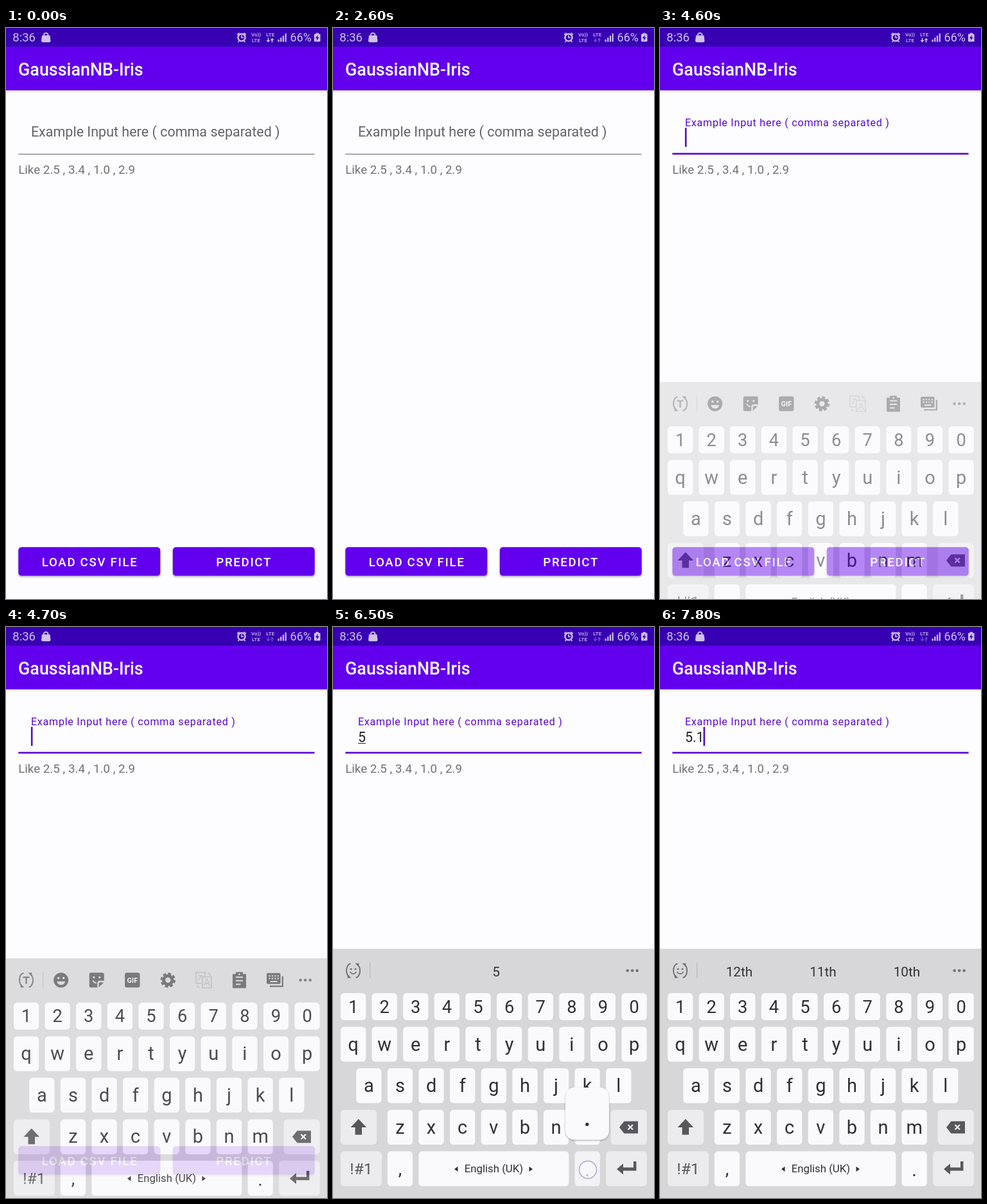
Recreate the animation shown at these times as an HTML page. Size 500 px wide and 889 px high, loop 8000 ms.

```html
<!DOCTYPE html>
<html lang="en">
<head>
<meta charset="utf-8">
<title>Iris classifier</title>
<style>
  html, body { margin: 0; width: 100%; height: 100%; overflow: hidden; background: #fdfdff; }
  svg { display: block; width: 100%; height: 100%; font-family: Roboto, sans-serif; }
  .button { filter: drop-shadow(0 2px 1.5px rgba(0, 0, 0, .3)); }
  .popup { filter: drop-shadow(0 1px 1px rgba(0, 0, 0, .35)); }
</style>
</head>
<body>
<svg id="stage" viewBox="0 0 500 889"></svg>
<script>
const LOOP = 8000, STEP = 100;
const PURPLE = '#6200ee', FOCUS = '#5808cc', ICON = '#666569', KEY = '#faf9fc', DARK_KEY = '#ecebee', BOARD = '#d7d6d9';
const STATUS = '#d0c2ee';

const rect = (x, y, w, h, fill, r = 0, more = '') =>
  `<rect x="${x}" y="${y}" width="${w}" height="${h}" rx="${r}" fill="${fill}" ${more}/>`;
const circle = (x, y, r, fill, more = '') => `<circle cx="${x}" cy="${y}" r="${r}" fill="${fill}" ${more}/>`;
const path = (d, fill, more = '') => `<path d="${d}" fill="${fill}" ${more}/>`;
const line = (d, color, width, more = '') => path(d, 'none', `stroke="${color}" stroke-width="${width}" ${more}`);
const text = (x, y, size, fill, str, more = '') =>
  `<text x="${x}" y="${y}" font-size="${size}" fill="${fill}" ${more}>${str}</text>`;
const group = (id, inner, more = '') => `<g id="${id}" ${more}>${inner}</g>`;
const at = (x, y, inner) => `<g transform="translate(${x} ${y})">${inner}</g>`;
const MID = 'text-anchor="middle"', BOLD = 'font-weight="700"', MEDIUM = 'font-weight="500"';

function statusBar() {
  const bars = [3.5, 6.5, 9.5, 13].map((h, i) => rect(423.5 + i * 3.7, 21.5 - h, 2.2, h, STATUS)).join('');
  return rect(0, 0, 500, 29, '#3700b3') +
    text(10.3, 21.3, 18.5, STATUS, '8:36') +
    path('M56 11.5H68.5L69.5 20Q69.5 22.3 67 22.3H57.5Q55 22.3 55 20Z', STATUS) +
    line('M59 13V10.5Q59 7.8 62.2 7.8T65.4 10.5V13', STATUS, 1.8) +
    circle(367, 14.8, 5.6, 'none', `stroke="${STATUS}" stroke-width="2.4"`) +
    line('M367 11.5V15H370M360.2 10.5L363.5 7.7M373.8 10.5L370.5 7.7M363 20L361.5 22M371 20L372.5 22', STATUS, 1.7) +
    text(389.5, 13.4, 8, STATUS, 'Vo))', MID + ' ' + MEDIUM) +
    text(389.5, 21.8, 8, STATUS, 'LTE', MID + ' ' + MEDIUM) +
    text(411.7, 13.4, 8, STATUS, 'LTE', MID + ' ' + MEDIUM) +
    path('M408.5 22.5L405.5 19H407.7V15.5H409.3V19H411.5Z', STATUS, 'id="down"') +
    path('M414.5 15.5L411.8 19H413.7V22.5H415.3V19H417.4Z', STATUS, 'id="up"') +
    bars +
    text(442.6, 21.3, 18, STATUS, '66%') +
    rect(480, 9.3, 9.6, 12, STATUS, 1.2) + rect(482.7, 7.7, 4.2, 2.5, STATUS) +
    path('M486 10.5L481.8 16H484.4L483.6 20L487.9 14.4H485.2Z', '#3700b3');
}

function page() {
  const hint = 'Example Input here ( comma separated )';
  const button = (x, tx, label) =>
    rect(x, 808.3, 221, 44.5, PURPLE, 4.8, 'class="button"') +
    text(tx, 837.6, 18.7, '#fff', label, MEDIUM + ' letter-spacing="1.67"');
  return rect(0, 0, 500, 889, '#fdfdff') +
    rect(0, 97, 500, 1.5, '#000', 0, 'opacity=".13"') + rect(0, 98.5, 500, 2, '#000', 0, 'opacity=".04"') +
    rect(0, 29, 500, 68, PURPLE) +
    text(19, 73.5, 26.9, '#fff', 'GaussianNB-Iris', MEDIUM) +
    text(38.9, 169, 21.5, '#646467', hint, 'id="hint"') +
    text(38.9, 153, 16.1, FOCUS, hint, 'id="label" letter-spacing=".75"') +
    text(38.9, 179, 21.4, '#222', '', 'id="input"') +
    rect(38.9, 180.6, 0, 1.2, '#333', 0, 'id="compose"') +
    rect(39, 155.5, 2.6, 29.5, '#4d10b8', 0, 'id="cursor"') +
    rect(19.3, 195.8, 461.3, 1.2, '#757578', 0, 'id="line"') +
    text(19.2, 227, 18.8, '#717174', 'Like 2.5 , 3.4 , 1.0 , 2.9') +
    button(19.3, 55.7, 'LOAD CSV FILE') + button(259.8, 327.3, 'PREDICT');
}

function swap() {
  return line('M-4 -10.5H-6Q-10.5 -7 -10.5 0T-6 9.5M4 10.5H6Q10.5 7 10.5 0T6 -9.5', '#747377', 2) +
    path('M-8.5 6L-3 11.5H-9ZM8.5 -6L3 -11.5H9Z', '#747377');
}

function tools() {
  const smile = circle(0, 0, 11.5, ICON) + circle(-4, -3.2, 1.8, BOARD) + circle(4, -3.2, 1.8, BOARD) +
    path('M-6.5 2H6.5Q5 7.5 0 7.5T-6.5 2Z', BOARD);
  const sticker = path('M-9 -11.5H9Q11.5 -11.5 11.5 -9V1H5Q1 1 1 5V11.5H-9Q-11.5 11.5 -11.5 9V-9Q-11.5 -11.5 -9 -11.5Z', ICON) +
    path('M3.5 11V5.5Q3.5 3.5 5.5 3.5H11Z', ICON) +
    circle(-4.5, -4.5, 1.6, BOARD) + circle(4.5, -4.5, 1.6, BOARD) + line('M-6 .5Q-4.5 4 -.5 4.5', BOARD, 1.8);
  const gif = rect(-11.7, -11.5, 23.4, 23, ICON, 3) + text(0, 4, 11, '#eeedf0', 'GIF', MID + ' ' + BOLD);
  const gear = circle(0, 0, 6.6, 'none', `stroke="${ICON}" stroke-width="5"`) +
    circle(0, 0, 10, 'none', `stroke="${ICON}" stroke-width="3.4" pathLength="80" stroke-dasharray="6 4"`);
  const pale = '#bebdc1';
  const translate = line('M-2 5H-12V-12H2V-5M-2 -5H12V12H-2Z', pale, 1.9) +
    text(5, 8.5, 15, pale, 'A', MID + ' ' + MEDIUM) +
    line('M-9 0L-4 -6M-8 -7H-2M6 -11Q10 -11 10 -7M-10 8Q-10 11 -6 11', pale, 1.8);
  const clip = path('M-10 -9H-5V-12H5V-9H10V12H-10Z', ICON, `stroke="${ICON}" stroke-linejoin="round"`) +
    line('M-5.5 -4.5H5.5M-5.5 1H5.5M-5.5 6.5H2', BOARD, 2.1) + circle(0, -9, 1.4, BOARD);
  const board = rect(-13, -11, 21.5, 17, ICON, 2) + line('M11.8 -6V9.5H-8', ICON, 2.2) +
    line('M-9.5 -6.5H6M-9.5 -2.5H6', BOARD, 2, 'stroke-dasharray="2.2 2.2"') + line('M-7 2.2H3.5', BOARD, 2);
  const icons = [smile, sticker, gif, gear, translate, clip, board];
  return icons.map((icon, i) => at(85.7 + i * 55.55, 535, icon)).join('') +
    at(31.5, 535, line('M-5 -4.5H5M0 -4.5V6', '#747377', 2.2));
}

function suggestions() {
  const face = circle(-3.5, -2.5, 1.5, '#747377') + circle(3.5, -2.5, 1.5, '#747377') + line('M-5 2Q0 8 5 2', '#747377', 1.8);
  return at(31.5, 535, face) +
    [0, 1, 2].map(i => text(123.5 + i * 130.5, 544, 20.8, '#343337', '', `${MID} class="word"`)).join('');
}

function key(x, y, w, h, label, base, size, fill = KEY, ink = '#302f33') {
  return `<g class="key" data-key="${label}">` + rect(x, y, w, h, fill, 5.5) +
    text(x + w / 2, base, size, ink, label, MID) + '</g>';
}

function keyboard() {
  const row = (chars, x, y, h, base, size) =>
    [...chars].map((c, i) => key(+(x + i * 48.62).toFixed(2), y, 39.3, h, c, base, size)).join('');
  const dots = [458.7, 466.2, 473.7].map(x => circle(x, 535, 2.3, '#747377')).join('');
  return rect(0, 501, 500, 440, BOARD) +
    at(31.5, 535, swap()) + rect(57, 522.5, 1.2, 24, '#bbbabd') + dots +
    group('tools', tools()) + group('suggest', suggestions()) +
    row('1234567890', 11.9, 570, 42, 600.5, 27.3) +
    row('qwertyuiop', 11.9, 622.5, 54.3, 659.5, 29) +
    row('asdfghjkl', 36.2, 687, 54.3, 724, 29) +
    row('zxcvbnm', 84.8, 751.8, 54.3, 788.5, 29) +
    rect(11.9, 751.8, 56.2, 54.3, DARK_KEY, 5.5) +
    path('M39.8 766L52 779H45V790.5H34.5V779H27.5Z', '#58575b') +
    rect(432.7, 751.8, 56.2, 54.3, DARK_KEY, 5.5) +
    path('M446 779L453.5 769.5H475V788.5H453.5Z', '#58575b') +
    line('M459.5 775L467 782.5M467 775L459.5 782.5', DARK_KEY, 2.3) +
    key(11.9, 816.3, 64, 54.3, '!#1', 852, 24.5, DARK_KEY, '#58575b') +
    key(84.8, 816.3, 39.3, 54.3, ',', 853, 28) +
    key(133.4, 816.3, 234, 54.3, 'English (UK)', 849, 16.8) +
    path('M194.5 840V848L189 844ZM305.5 840V848L311 844Z', '#302f33') +
    key(376.5, 816.3, 39.3, 54.3, '.', 855, 29) +
    rect(425.2, 816.3, 63.7, 54.3, DARK_KEY, 5.5) +
    path('M442 844L452 835.5V841.5H468V832H472.5V846.5H452V852.5Z', '#58575b') +
    group('popup', rect(-34, 0, 68, 81.5, KEY, 14, 'class="popup"') +
      text(0, 60.3, 48, '#302f33', '', MID + ' id="big"')) +
    circle(0, 0, 13.5, 'rgba(255,255,255,.35)', 'id="touch" stroke="#bdb3dc" stroke-width="1.8"');
}

const stage = document.getElementById('stage');
stage.innerHTML = page() + statusBar() + group('board', keyboard());
const $ = id => document.getElementById(id);
const words = [...stage.querySelectorAll('.word')];
const keys = [...stage.querySelectorAll('.key')];

// Each track lists [start time, value]; a value holds until the next entry.
const SPACE = 'English (UK)';
const tracks = {
  link: [[0, 2], [300, 1], [500, 0], [900, 2], [2600, 0], [2700, 2], [3000, 0], [4600, 2], [4700, 0], [5800, 2], [5900, 0]],
  focus: [[0, false], [3400, true]],
  raised: [[0, false], [3700, true]],
  cursor: [[0, false], [3400, true], [3900, false], [4400, true], [4900, false], [5400, true], [6300, false], [6600, true]],
  input: [[0, ''], [5800, '5'], [6600, '5.'], [6900, '5.1']],
  compose: [[0, true], [7600, false]],
  press: [[0, ''], [5600, '5'], [5900, ''], [6500, '.'], [6700, ''], [6800, '1'], [7100, ''], [7500, SPACE], [7700, '']],
  words: [[0, null], [5900, ['', '5', '']], [6600, null], [7100, ['', '5.1', '']], [7600, ['12th', '11th', '10th']]]
};
const touches = { '5': [225.5, 596], '1': [31, 600], '.': [397, 845], [SPACE]: [250, 845] };
const popups = { '5': [226, 471], '1': [47.3, 471], '.': [396, 717] };

const value = (name, t) => tracks[name].reduce((v, [start, next]) => t >= start ? next : v, null);
const set = (el, attrs) => Object.entries(attrs).forEach(([k, v]) => el.setAttribute(k, v));
const show = (id, on) => set($(id), { visibility: on ? 'visible' : 'hidden' });
const move = (id, [x, y]) => set($(id), { transform: `translate(${x} ${y})` });

function draw(time) {
  const t = Math.floor(time % LOOP / STEP) * STEP;
  const now = {};
  for (const name in tracks) now[name] = value(name, t);

  set($('up'), { opacity: now.link > 0 ? 1 : .38 });
  set($('down'), { opacity: now.link > 1 ? 1 : .38 });
  show('hint', !now.raised);
  show('label', now.raised);
  set($('line'), now.focus ? { y: 194.5, height: 2.6, fill: FOCUS } : { y: 195.8, height: 1.2, fill: '#757578' });

  // Roboto digits are .5615em wide, the point .263em.
  const width = [...now.input].reduce((w, c) => w + 21.4 * (c === '.' ? .263 : .5615), 0);
  $('input').textContent = now.input;
  set($('compose'), { width: now.compose ? width : 0 });
  set($('cursor'), { x: 38.9 + Math.max(0, width - 1) });
  show('cursor', now.cursor);

  const rise = Math.min(1, Math.max(0, (t - 4600) / 300));
  const left = (1 - rise) ** 3;
  show('board', t >= 4600);
  move('board', [0, 50 * left]);
  set($('board'), { opacity: 1 - .46 * left });

  const up = t >= 4600;
  show('tools', up && !now.words);
  show('suggest', up && now.words);
  words.forEach((w, i) => w.textContent = now.words ? now.words[i] : '');

  keys.forEach(k => {
    const down = k.dataset.key === now.press;
    set(k.lastChild, { opacity: down ? .45 : 1 });
    set(k.firstChild, { opacity: down ? .8 : 1 });
  });
  const pop = popups[now.press];
  show('popup', pop);
  if (pop) move('popup', pop);
  $('big').textContent = pop ? now.press : '';
  show('touch', now.press);
  if (now.press) move('touch', touches[now.press]);
}

const begin = performance.now();
function tick() {
  draw(performance.now() - begin);
  requestAnimationFrame(tick);
}
tick();
</script>
</body>
</html>
```
